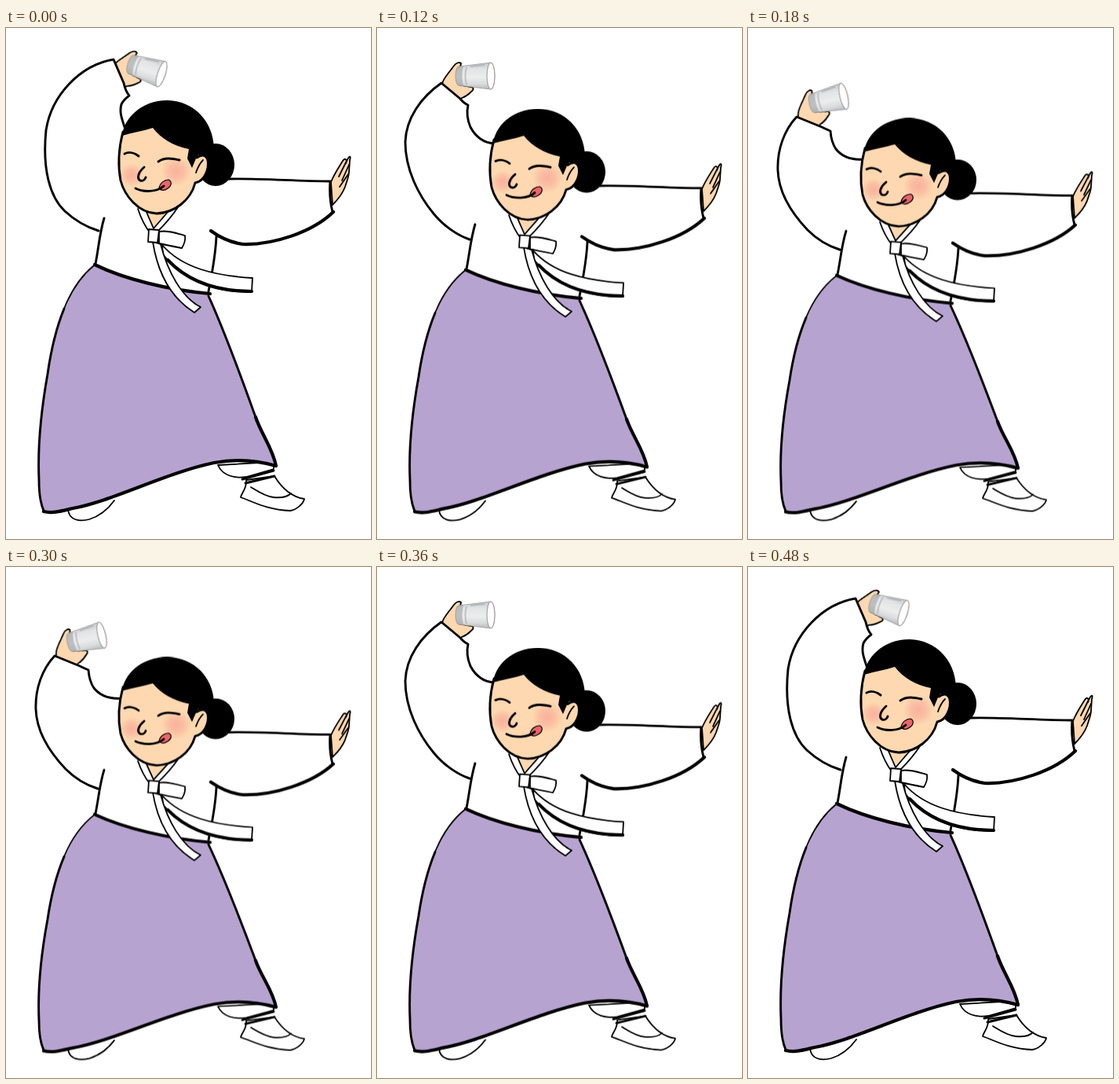
Animation of 465 by 650 pixels, one loop 0.54 s. Source, as an HTML page without scripts:

```html
<!DOCTYPE html>
<html lang="en">
<head>
<meta charset="utf-8">
<title>Dancer with a glass</title>
<style>
  html, body { margin: 0; width: 100%; height: 100%; overflow: hidden; background: #fff; }
  svg { display: block; width: 100vw; height: 100vh; }

  .ink { fill: none; stroke: #000; stroke-width: 2.9; stroke-linecap: round; stroke-linejoin: round; }
  .bold { stroke-width: 4.2; }
  .fine { stroke-width: 1.8; }
  .white { fill: #fff; }
  .skin { fill: #fdd8b0; }
  .hair { fill: #000; }
  .cloth { fill: #b7a3cf; }

  /* nine held poses, down and back up */
  .body, .arm, .hand { animation: 540ms step-end infinite; }
  .body { animation-name: squash; transform-origin: 0 627px; }
  .arm { animation-name: swing; }
  .hand { animation-name: wave; }

  @keyframes squash {
    0%, 88.88%, 100% { transform: scaleY(1); }
    11.11%, 77.77% { transform: scaleY(.99); }
    22.22%, 66.66% { transform: scaleY(.98); }
    33.33%, 55.55% { transform: scaleY(.958); }
    44.44% { transform: scaleY(.917); }
  }
  @keyframes wave {
    0%, 88.88%, 100% { transform: translate(159px, 46px) rotate(18deg); }
    11.11%, 77.77% { transform: translate(131px, 43px) rotate(9deg); }
    22.22%, 66.66% { transform: translate(104px, 61px) rotate(0deg); }
    33.33%, 55.55% { transform: translate(82px, 96px) rotate(-13deg); }
    44.44% { transform: translate(66px, 132px) rotate(-31deg); }
  }
  /* armpit, cuff, then the outer edge down to the waist */
  @keyframes swing {
    0%, 88.88%, 100% { d: path("M152 129C148 116 144 108 147 97Q150 91 157 86Q152 80 150 70L137 40C95 47 58 85 51 130C46 180 56 215 75 233C88 245 105 254 118 258"); }
    11.11%, 77.77% { d: path("M150 138C140 133 132 124 130 112Q130 103 138 93Q132 86 129 76L109 49C73 62 44 98 42 140C43 180 60 215 77 236C88 249 104 259 118 264"); }
    22.22%, 66.66% { d: path("M149 147C136 146 126 139 119 126Q113 112 116 98Q111 96 106 90L82 70C56 88 37 115 36 145C36 180 53 213 72 236C85 252 103 264 118 269"); }
    33.33%, 55.55% { d: path("M147 167C134 168 121 165 112 154Q106 145 105 131Q100 129 94 126L62 113C46 130 37 155 38 181C39 210 57 237 76 257C89 270 104 278 117 282"); }
    44.44% { d: path("M147 187C134 191 120 193 111 186Q101 180 93 164Q86 163 78 161L47 155C37 167 32 190 34 212C35 233 51 252 70 271C84 286 101 295 116 301"); }
  }
</style>
</head>
<body>
<svg viewBox="0 0 465 650">
  <defs>
    <radialGradient id="blush">
      <stop offset="0" stop-color="#f8a596" stop-opacity=".75"/>
      <stop offset=".5" stop-color="#f8a596" stop-opacity=".5"/>
      <stop offset="1" stop-color="#f8a596" stop-opacity="0"/>
    </radialGradient>
    <linearGradient id="shine" x1="0" y1="0" x2="0" y2="1">
      <stop offset="0" stop-color="#c3c6c8"/>
      <stop offset=".25" stop-color="#e2e4e5"/>
      <stop offset=".55" stop-color="#eceded"/>
      <stop offset=".8" stop-color="#d9dbdc"/>
      <stop offset="1" stop-color="#b4b7b9"/>
    </linearGradient>
  </defs>

  <g class="hand">
    <path class="ink fine skin" d="M-22 14L-20 7C-17 0 -10 -7 -6 -13C-3 -17 1 -18 3 -16C3 -12 0 -8 -1 -2L0 11L16 14C20 15 19 18 16 20C13 23 10 26 4 28L-5 36Z"/>
    <path fill="url(#shine)" stroke="#999" stroke-width=".8" d="M0 -12L41 -17A5 17 0 0 1 41 17L0 12A4 12 0 0 1 0 -12Z"/>
    <path fill="#85898c" opacity=".45" d="M0 -12L6 -12.600Q3 0 6 12.600L0 12A4 12 0 0 1 0 -12Z"/>
    <path fill="none" stroke="#a4a7a9" stroke-width="2" opacity=".6" d="M10 -11Q7 0 10 11M15 -12L33 -14"/>
    <ellipse cx="41" cy="0" rx="5" ry="17" fill="#fdfdfd" stroke="#888" stroke-width=".9"/>
  </g>

  <path class="arm ink white" d="M152 129C148 116 144 108 147 97Q150 91 157 86Q152 80 150 70L137 40C95 47 58 85 51 130C46 180 56 215 75 233C88 245 105 254 118 258"/>

  <g class="body">
    <g class="feet">
      <path class="ink fine white" d="M79 612C80 627 95 628 106 625C119 621 130 612 138 601"/>
      <path class="ink fine white" d="M270 556C276 570 292 573 306 571L341 561V552Z"/>
      <path class="ink fine white" d="M306 575C307 586 300 591 299 597C314 602 332 613 362 614C370 613 379 605 380 599C367 597 353 588 342 570Z"/>
      <path class="ink" d="M301 574L341 563M305 579L342 570"/>
      <path class="ink fine" d="M312 584C320 589 330 596 341 597C352 598 359 596 363 592"/>
    </g>

    <g class="right-arm">
      <path class="ink fine skin" d="M414 196C418 186 424 177 429 169C432 164 435 168 433 172C437 161 440 162 438 168L437 183C437 189 434 195 432 202C429 210 424 217 416 225Z"/>
      <path class="ink fine" d="M433 171L424 189M437 174L428 194M436 186L425 202"/>
      <path class="ink" d="M284 192C325 191 370 195 413 195C412 208 413 222 416 234"/>
      <path class="ink bold" d="M417 234C390 260 340 276 302 275C286 273 272 266 261 258"/>
    </g>

    <g class="skirt">
      <path class="cloth" d="M112 302C80 325 61 390 53 440C42 500 37 560 48 615C60 618 72 614 85 611C135 602 203 566 265 553C292 548 320 550 344 557C340 535 325 516 318 495C299 442 279 387 257 338C205 333 150 319 112 302Z"/>
      <path class="ink fine" d="M112 302C95 316 82 337 74 357"/>
      <path class="ink" d="M74 357C63 384 57 412 53 440C45 485 40 530 42 574C42 592 44 605 48 614"/>
      <path class="ink bold" d="M48 615C60 618 72 614 85 611C135 602 203 566 265 553C292 548 320 550 344 557C340 535 325 516 318 495"/>
      <path class="ink" d="M318 495C299 442 279 387 258 341"/>
    </g>

    <path class="ink" d="M125 242C119 262 118 280 114 300"/>
    <path class="ink bold" d="M113 301C150 319 205 333 260 338"/>
    <path class="ink" d="M268 265C267 288 263 310 258 335"/>

    <path class="skin" d="M177 228L188 256L210 230Z"/>
    <path class="ink fine" d="M168 230C172 242 177 252 183 260M178 232L188 255L207 233M219 228C211 240 203 249 194 258"/>

    <g class="ribbon">
      <path class="ink white fine" d="M199 276C224 305 265 315 314 318L313 336C270 336 230 325 200 288Z"/>
      <path class="ink bold" d="M313 335C275 335 235 326 206 295"/>
      <path class="ink white fine" d="M187 272C193 310 208 342 240 362L248 355C224 343 206 310 197 275Z"/>
      <path class="ink white fine" d="M195 259C205 257 217 261 228 264C229 270 227 275 224 280C214 278 204 276 195 274Z"/>
      <path class="ink white fine" d="M182 256L195 257L193 273L181 272Z"/>
    </g>

    <g class="head">
      <ellipse class="hair" cx="267" cy="174" rx="24" ry="27"/>
      <path class="ink skin" d="M149 132C143 155 143 178 146 194C151 213 168 235 192 236C214 235 235 220 241 197C253 195 259 179 257 168C254 159 247 162 243 165L230 125L190 110Z"/>
      <circle cx="160" cy="187" r="15" fill="url(#blush)"/>
      <circle cx="217" cy="182" r="19" fill="url(#blush)"/>
      <path class="hair" d="M148 137C150 116 171 92 206 92C240 93 264 119 265 153L258 163C251 157 245 160 242 166L237 178L231 166L233 154C213 150 197 140 187 127C175 131 161 133 148 137Z"/>
      <path class="ink fine" d="M251 168C246 173 244 178 242 184"/>
      <path class="ink" d="M151 160C157 157 164 159 169 163M194 170C202 164 212 166 221 168"/>
      <path class="ink" d="M176 177C169 183 166 191 171 194C174 195 177 193 178 190"/>
      <path fill="#e9646c" stroke="#000" stroke-width="1.200" d="M195 204C196 197 202 193 207 193C212 195 211 201 206 204C202 207 198 207 195 204Z"/>
      <path class="ink" d="M165 204C175 209 192 209 201 201"/>
    </g>
  </g>
</svg>
</body>
</html>
```
